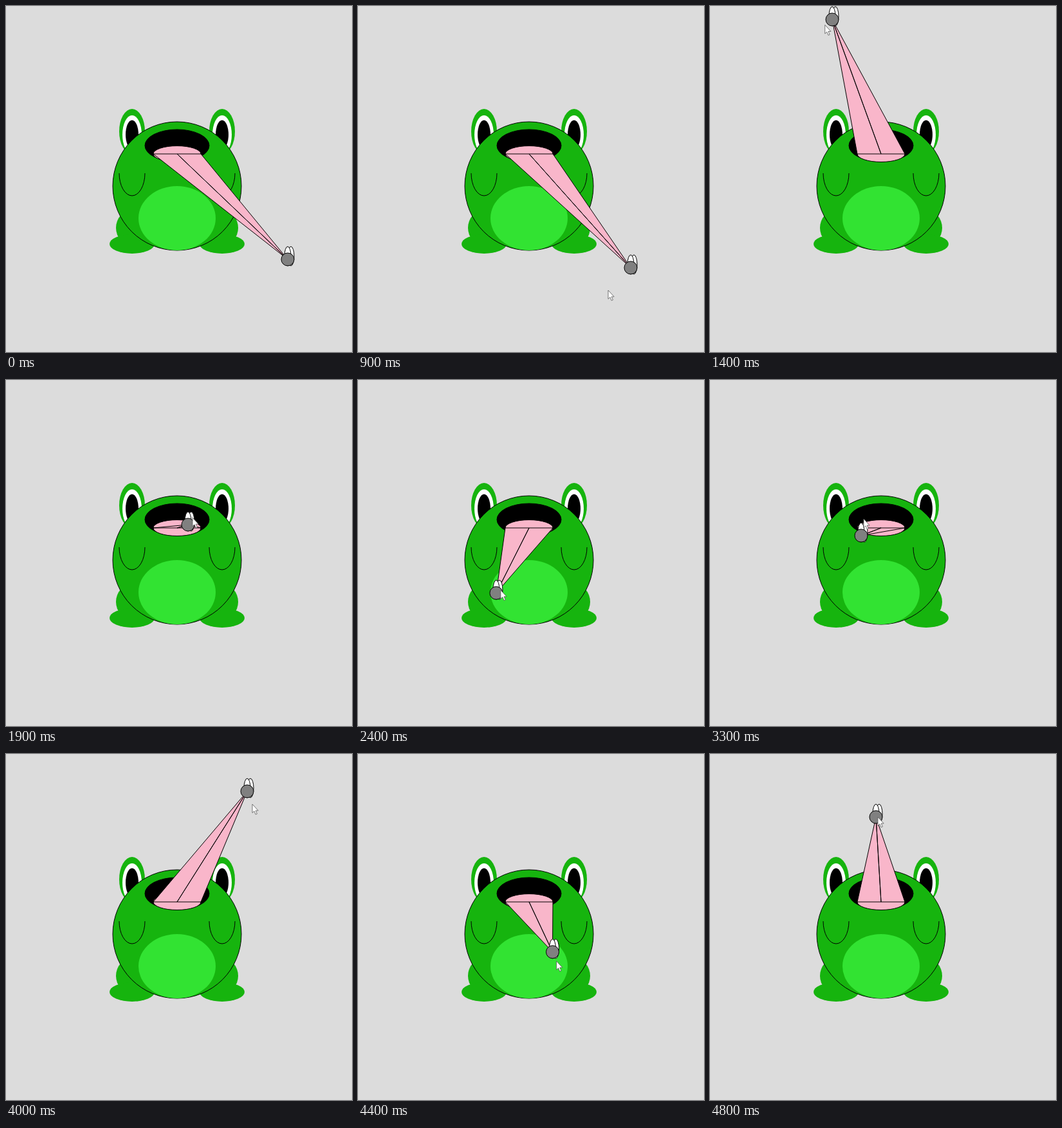
An HTML page for the animation above (4.9 s loop, 538x538 px).

```html
<!DOCTYPE html>
<html lang="en">
<head>
<meta charset="utf-8">
<title>Frog and fly</title>
<style>
  html, body { margin: 0; width: 100%; height: 100%; overflow: hidden; background: #dcdcdc; }
  svg { display: block; width: 100vw; height: 100vh; }
  .skin { fill: #16b40e; }
  .ink { stroke: #000; }
  .pink { fill: #f9b6ca; stroke-linejoin: round; }
</style>
</head>
<body>
<svg viewBox="0 0 538 538">
  <defs>
    <g id="eye">
      <ellipse class="skin" cy="195" rx="20" ry="35"/>
      <ellipse cy="200" rx="15" ry="30" fill="#fff"/>
      <ellipse cy="200" rx="10" ry="22.5"/>
    </g>
    <g id="leg" class="skin">
      <ellipse cy="345" rx="25" ry="27.5"/>
      <ellipse cy="370" rx="35" ry="15"/>
    </g>
    <path id="arm" class="ink" fill="none" d="M-20 260A20 35 0 0 0 20 260"/>
    <ellipse id="wing" cy="-5" rx="5" ry="15" fill="#fff"/>
  </defs>

  <use href="#eye" x="196"/><use href="#eye" x="336"/>
  <use href="#leg" x="196"/><use href="#leg" x="336"/>
  <circle class="skin ink" cx="266" cy="280" r="100"/>
  <ellipse cx="266" cy="330" rx="60" ry="50" fill="#32e332"/>
  <use href="#arm" x="196"/><use href="#arm" x="336"/>
  <ellipse class="ink" cx="266" cy="217" rx="50" ry="25"/>
  <ellipse class="pink ink" cx="266" cy="230" rx="37" ry="12.5"/>
  <path id="tongue" class="pink ink"/>

  <g id="fly" class="ink">
    <use href="#wing" x="5"/><use href="#wing"/>
    <circle r="10" fill="#808080"/>
  </g>
  <path id="cursor" d="M0 0V13.5L3 10.8L5.2 16L7.4 15L5.2 10H9.2Z" fill="#fff" stroke="#555" stroke-width=".8"/>
</svg>
<script>
  const LOOP = 4900, HOLD = 900, STEP = 100;

  // Turning points of the fly: [step, x, y]
  const flight = [
    [0, 438, 394], [1, 424, 407], [3, 110, 505], [6, 190, 21], [8, 506, 150], [10, 400, 445],
    [11, 283, 225], [14, 340, 390], [17, 154, 300], [20, 104, 321], [22, 150, 70], [24, 300, 376],
    [25, 235, 242], [28, 370, 290], [30, 180, 310], [32, 375, 58], [34, 421, 320], [38, 188, 230],
    [40, 258, 98]
  ];

  // Pointer offset from the fly: [step, dx, dy]
  const lead = [[1, -35, 35], [11, 7, -11], [20, 3, 1], [25, 4, -26], [32, 8, 20], [40, 3, 0]];

  const [tongue, fly, cursor] = ["tongue", "fly", "cursor"].map(id => document.getElementById(id));
  const place = (el, x, y) => el.setAttribute("transform", `translate(${x} ${y})`);

  // Smooth curve through timed points
  function along(points, step) {
    const i = Math.max(1, points.findIndex(p => p[0] >= step));
    const at = n => points[Math.min(Math.max(n, 0), points.length - 1)];
    const a = at(i - 1), b = at(i), span = b[0] - a[0];
    const k = (step - a[0]) / span, ease = k * k * (3 - 2 * k);
    const slope = (n, c) => (at(n + 1)[c] - at(n - 1)[c]) / (at(n + 1)[0] - at(n - 1)[0]);
    return [1, 2].map(c =>
      a[c] + (b[c] - a[c]) * ease +
      span * k * (1 - k) * ((1 - k) * slope(i - 1, c) - k * slope(i, c)));
  }

  function draw(now) {
    const t = now % LOOP;
    const step = t < HOLD ? 0 : Math.floor((t - HOLD) / STEP) + 1;
    const [x, y] = along(flight, step);
    tongue.setAttribute("d", `M229 230H266L${x} ${y}ZM266 230H303L${x} ${y}Z`);
    place(fly, x, y);
    cursor.style.visibility = step ? "visible" : "hidden";
    if (step) {
      const [dx, dy] = along(lead, step);
      place(cursor, x + dx, y + dy);
    }
  }

  const start = performance.now();
  function tick() {
    draw(performance.now() - start);
    requestAnimationFrame(tick);
  }
  tick();
</script>
</body>
</html>
```
